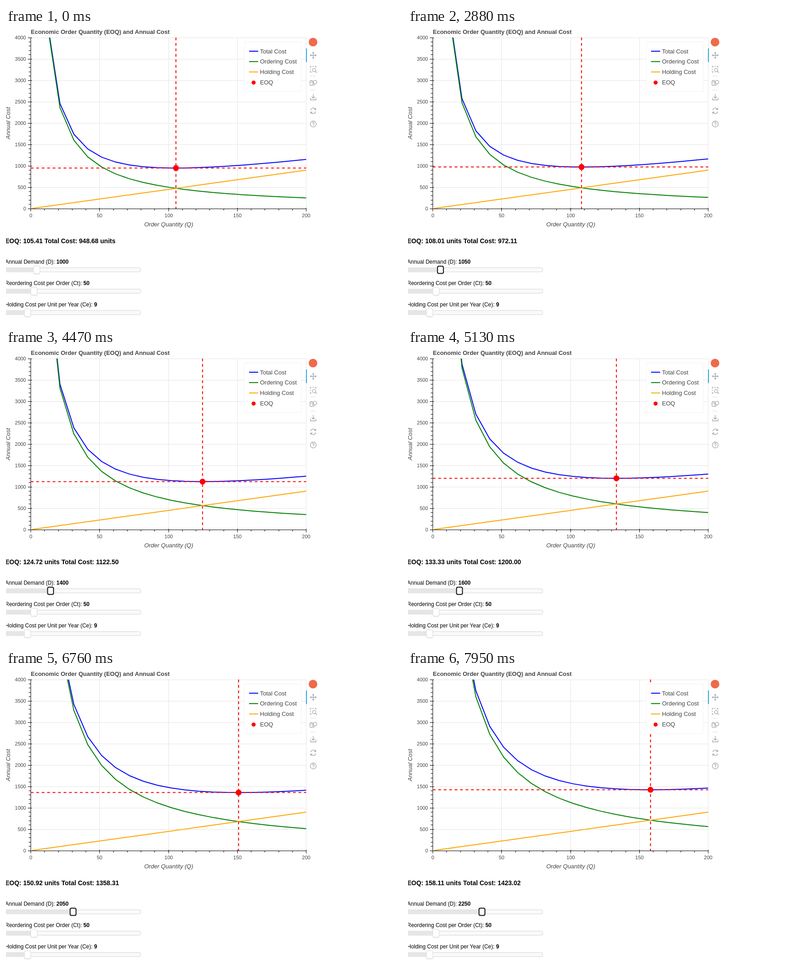
Animation, 870 px wide and 644 px high, one loop 8000 ms. Source, as an HTML page:

```html
<!DOCTYPE html>
<html lang="en">
<head>
<meta charset="utf-8">
<title>Economic Order Quantity</title>
<style>
html, body { margin: 0; width: 100%; height: 100%; overflow: hidden; background: #fff; }
svg { display: block; width: 870px; height: 644px; font-family: "Liberation Sans", Arial, sans-serif; }
text { white-space: pre; }
.b { font-weight: bold; }
.axis { font-size: 11px; fill: #444; }
.label { font-size: 13px; font-style: italic; fill: #444; }
.line { fill: none; stroke-width: 2; stroke-linejoin: round; }
.span { stroke: red; stroke-width: 2; stroke-dasharray: 6; }
.icon { fill: none; stroke: #a1a6a9; stroke-width: 1.3; }
</style>
</head>
<body>
<svg viewBox="0 0 870 644">
  <defs><clipPath id="clip"><rect x="54.5" y="21" width="605" height="376"/></clipPath></defs>
  <text x="54.5" y="12.5" font-size="13" class="b" fill="#444">Economic Order Quantity (EOQ) and Annual Cost</text>
  <g id="grid" stroke="#e5e5e5"></g>
  <g id="axes" stroke="#000"></g>
  <g id="ticks" class="axis"></g>
  <text class="label" x="357.5" y="436" text-anchor="middle">Order Quantity (Q)</text>
  <text class="label" transform="translate(9 209) rotate(-90)" text-anchor="middle">Annual Cost</text>
  <g clip-path="url(#clip)">
    <path id="total" class="line" stroke="blue"/>
    <path id="order" class="line" stroke="green"/>
    <path id="hold" class="line" stroke="orange"/>
  </g>
  <path id="vspan" class="span"/>
  <path id="hspan" class="span"/>
  <circle id="dot" r="6.5" fill="red"/>

  <rect x="523.5" y="30.5" width="125" height="109" fill="#fff" fill-opacity=".95" stroke="#e5e5e5" stroke-opacity=".5"/>
  <g id="legend" font-size="13" fill="#444"></g>

  <circle cx="674.5" cy="31" r="9.5" fill="#ee6a4b"/>
  <path d="M660 45V75" stroke="#26aae1" stroke-width="2"/>
  <path d="M669 105.5H680M669 136.5H680" stroke="#ddd"/>
  <g class="icon">
    <path d="M668.5 60H681.5M675 53.5V66.5M670.5 58L668.5 60L670.5 62M679.5 58L681.5 60L679.5 62M673 55.5L675 53.5L677 55.5M673 64.5L675 66.5L677 64.5"/>
    <path d="M668.5 87V84.5H671M673.5 84.5H676M678.5 84.5H681V87M668.5 89.5V92M668.5 94.5V97H671"/>
    <circle cx="677" cy="92.5" r="3.6"/><path d="M679.6 95L683 98.5"/>
    <rect x="667.8" y="115.5" width="6.4" height="11" rx="3.2"/><path d="M671 117.5V120.5"/>
    <circle cx="679" cy="119" r="3.8"/><path d="M677.5 122.5L675.8 127.5"/>
    <path d="M675 145V154M671.5 150.8L675 154.3L678.5 150.8M669 153.5V158H681V153.5"/>
    <path d="M669.5 180.5A5.7 5.7 0 0 1 680 178.8M680.5 175.5V179.3H676.7M680.5 183.5A5.7 5.7 0 0 1 670 185.2M669.5 188.5V184.7H673.3"/>
    <circle cx="675" cy="211" r="6.5"/>
    <path d="M673 209.6A2 2 0 1 1 675.8 211.3Q675 211.7 675 212.5M675 213.8V215"/>
  </g>

  <text id="result" x="-2" y="473" class="b" font-size="14"></text>
  <g id="sliders" font-size="12"></g>
</svg>
<script>
const LOOP = 8000, CT = 50, CE = 9, FOCUS_AT = 1000;
// Moments at which one arrow key press raises demand by 50.
const presses = [2880, 3280, 3480, 3740, 3940, 4070, 4270, 4470, 4670, 4800, 5000, 5130,
  5330, 5470, 5670, 5870, 6020, 6150, 6360, 6560, 6760, 6890, 7090, 7290, 7490, 7690];
const BACK_AT = 7950;

const $ = id => document.getElementById(id);
const px = q => 54.5 + q * 3.025;
const py = c => 397 - c * 0.094;
const set = (el, attrs) => { for (const k in attrs) el.setAttribute(k, attrs[k]); };
const add = (parent, tag, attrs, text) => {
  const el = document.createElementNS("http://www.w3.org/2000/svg", tag);
  set(el, attrs);
  if (text !== undefined) el.textContent = text;
  parent.appendChild(el);
  return el;
};
const crisp = v => Math.floor(v) + 0.5;

function buildAxes() {
  let grid = "", axes = "M54.5 21V397.5M54.5 397.5H660";
  for (let q = 0; q <= 200; q += 10) {
    const x = crisp(px(q)), major = q % 50 === 0;
    axes += `M${x} ${major ? 395 : 397}V${major ? 403 : 401}`;
    if (major) {
      grid += `M${x} 21V397`;
      add($("ticks"), "text", { x, y: 416, "text-anchor": "middle" }, q);
    }
  }
  for (let c = 0; c <= 4000; c += 100) {
    const y = crisp(py(c)), major = c % 500 === 0;
    axes += `M${major ? 48 : 50} ${y}H${major ? 57 : 54}`;
    if (major) {
      grid += `M55 ${y}H660`;
      add($("ticks"), "text", { x: 44, y: y + 3.5, "text-anchor": "end" }, c);
    }
  }
  add($("grid"), "path", { d: grid });
  add($("axes"), "path", { d: axes });
}

function buildLegend() {
  [["Total Cost", "blue"], ["Ordering Cost", "green"], ["Holding Cost", "orange"], ["EOQ", "red"]]
    .forEach(([name, color], i) => {
      const y = 51 + i * 22.8;
      if (name === "EOQ") add($("legend"), "circle", { cx: 544, cy: y + 0.5, r: 4.5, fill: color });
      else add($("legend"), "path", { d: `M534 ${y}H554`, stroke: color, "stroke-width": 2 });
      add($("legend"), "text", { x: 558, y: y + 4.5 }, name);
    });
}

function makeSlider(name, y) {
  const g = $("sliders");
  const text = add(g, "text", { x: -2, y: y - 13.5 }, name + ": ");
  const value = add(text, "tspan", { class: "b" });
  add(g, "rect", { x: -5, y: y - 4.5, width: 301, height: 9, rx: 3.5, fill: "#fafafa", stroke: "#d3d3d3" });
  const fill = add(g, "rect", { x: -5, y: y - 4, height: 8, fill: "#e6e6e6" });
  const shade = add(g, "rect", { y: y - 7, width: 15, height: 18, rx: 3, fill: "#000", "fill-opacity": 0.06 });
  const knob = add(g, "rect", { y: y - 8.5, width: 14, height: 17, rx: 3, fill: "#fff" });
  return (v, x, focus) => {
    value.textContent = v;
    set(fill, { width: x + 5 });
    set(shade, { x: x - 7.5, visibility: focus ? "hidden" : "visible" });
    set(knob, {
      x: x - (focus ? 6.5 : 7), y: y - (focus ? 8 : 8.5),
      width: focus ? 13 : 14, height: focus ? 16 : 17,
      stroke: focus ? "#101010" : "#d9d9d9", "stroke-width": focus ? 2 : 1
    });
  };
}

function curve(cost) {
  let d = "";
  for (let i = 0; i < 23; i++) {
    const q = 1 + i * 999 / 99;
    d += `${i ? "L" : "M"}${px(q).toFixed(2)} ${py(cost(q)).toFixed(2)}`;
  }
  return d;
}

buildAxes();
buildLegend();
const demandSlider = makeSlider("Annual Demand (D)", 531.5);
makeSlider("Reordering Cost per Order (Ct)", 578.5)(CT, 61.5, false);
makeSlider("Holding Cost per Unit per Year (Ce)", 625.5)(CE, 47.5, false);
set($("hold"), { d: curve(q => q * CE / 2) });

function render(t) {
  const steps = presses.filter(p => p <= t).length - (t >= BACK_AT ? 1 : 0);
  const demand = 1000 + 50 * steps;
  const ordering = q => demand * CT / q;
  const total = q => ordering(q) + q * CE / 2;
  const eoq = Math.sqrt(2 * demand * CT / CE), best = total(eoq);
  const x = px(eoq), y = py(best);
  set($("total"), { d: curve(total) });
  set($("order"), { d: curve(ordering) });
  set($("vspan"), { d: `M${x} 21V397` });
  set($("hspan"), { d: `M54.5 ${y}H659.5` });
  set($("dot"), { cx: x, cy: y });
  const q = eoq.toFixed(2), c = best.toFixed(2);
  $("result").textContent = steps
    ? `EOQ: ${q} units Total Cost: ${c}`
    : `EOQ: ${q} Total Cost: ${c} units`;
  demandSlider(demand, 67.5 + (demand - 1000) * 0.076, t >= FOCUS_AT);
}

const start = performance.now();
function tick() {
  render((performance.now() - start) % LOOP);
  requestAnimationFrame(tick);
}
tick();
</script>
</body>
</html>
```
